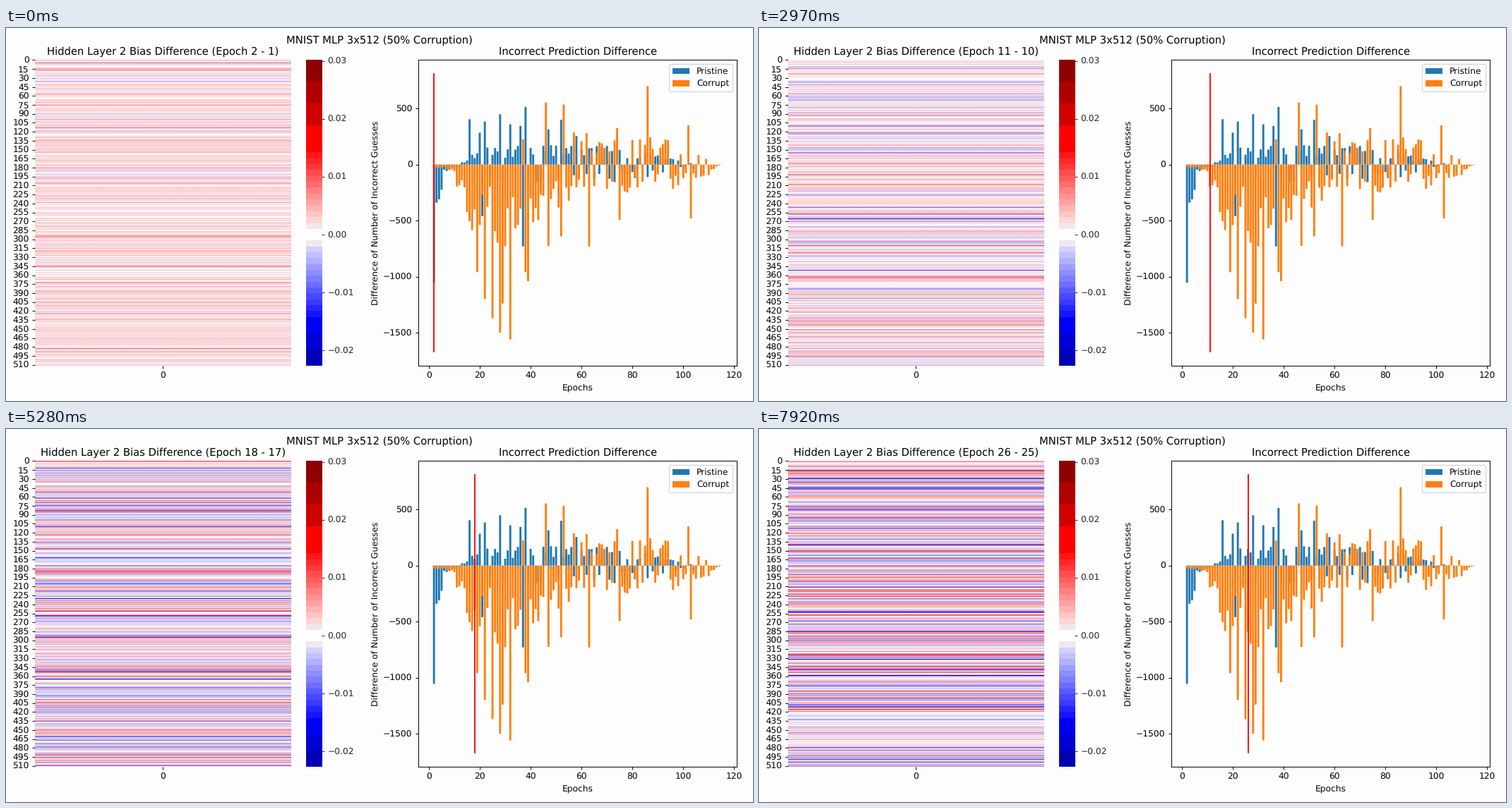
Animation, 1058 px wide and 529 px high, one loop 8 s. Source, as a matplotlib script:

```python
import numpy as np
import matplotlib.pyplot as plt
from matplotlib.animation import FuncAnimation
from matplotlib.colors import BoundaryNorm, ListedColormap, to_rgba
from matplotlib.patches import PathPatch
from matplotlib.path import Path

W, H = 1058, 529
PAPER = "#fdfdfd"
STEP_MS, TICK_MS, FRAMES = 330, 40, 200
STEPS, ROWS = 25, 512
LOW, HIGH = -0.0227, 0.0302
EPOCHS = np.arange(2, 116)


def guess_changes(seed, envelope, rise_from, rise_share, peaks):
    """Random bars under an envelope, with the tallest ones set by hand."""
    rng = np.random.default_rng(seed)
    height = np.interp(EPOCHS, *zip(*envelope)) * rng.uniform(0.35, 1, len(EPOCHS))
    rises = (EPOCHS >= rise_from) & (rng.random(len(EPOCHS)) < rise_share)
    values = np.where(rises, height, -height)
    for epoch, peak in peaks.items():
        values[epoch - EPOCHS[0]] = peak
    return values


def bias_differences():
    """One row of biases per step; the spread grows and the mean sinks to zero."""
    rng = np.random.default_rng(7)
    noise = rng.laplace(scale=0.7, size=ROWS)
    table = []
    for step in range(STEPS):
        mean = 0.0018 * max(0, 1 - step / 16)
        row = mean + (0.0023 + 0.00016 * step) * noise
        table.append(np.clip(row, LOW + 1e-5, HIGH - 1e-5))
        noise = 0.6 * noise + 0.8 * rng.laplace(scale=0.7, size=ROWS)
    return table


def banded_seismic():
    edges = np.concatenate([
        [LOW, -0.0199, -0.0172], np.linspace(-0.0143, -0.0011, 14),
        np.linspace(0.0009, 0.0141, 14), [0.0188, 0.0227, 0.0263, HIGH]])
    mids = (edges[:-1] + edges[1:]) / 2
    colors = plt.get_cmap("seismic")(0.5 + mids / (2 * HIGH))
    middle = np.searchsorted(edges, 0) - 1
    colors[middle] = to_rgba(PAPER)
    colors[[middle - 1, middle + 1]] = to_rgba("#f3e7ee")
    colors[np.searchsorted(edges, 0.015) - 1] = to_rgba("red")
    return ListedColormap(colors), BoundaryNorm(edges, len(colors))


def add_axes(left, right, top=45, bottom=479):
    return fig.add_axes([left / W, 1 - bottom / H,
                         (right - left) / W, (bottom - top) / H], facecolor=PAPER)


def add_bars(ax, values, color, label):
    verts = []
    for epoch, value in zip(EPOCHS, values):
        a, b = epoch - 0.4, epoch + 0.4
        verts += [(a, 0), (a, value), (b, value), (b, 0), (a, 0)]
    codes = ([Path.MOVETO] + [Path.LINETO] * 4) * len(values)
    ax.add_patch(PathPatch(Path(verts, codes), fc=color, lw=0, snap=False, label=label))


def add_bands(ax, values, extent, interpolation):
    ax.spines[:].set_visible(False)
    return ax.imshow(np.reshape(values, (-1, 1)), cmap=cmap, norm=norm,
                     aspect="auto", extent=extent, interpolation=interpolation,
                     interpolation_stage="rgba")


plt.rcParams.update({"font.family": "DejaVu Sans", "text.hinting": "no_hinting"})
fig = plt.figure(figsize=(12, 6), dpi=88.1667, facecolor=PAPER)
fig.suptitle("MNIST MLP 3x512 (50% Corruption)")
cmap, norm = banded_seismic()
biases = bias_differences()

heat_ax = add_axes(41.3, 403.3)
heat = add_bands(heat_ax, biases[0], (0, 1, ROWS, 0), "antialiased")
heat_ax.set_xticks([0.5], ["0"])
labels = range(0, ROWS, 15)
heat_ax.set_yticks([n + 0.5 for n in labels], [str(n) for n in labels])
title = heat_ax.set_title("")

scale_ax = add_axes(425, 447)
add_bands(scale_ax, np.linspace(HIGH - 1e-6, LOW + 1e-6, 868),
          (0, 1, LOW, HIGH), "nearest")
scale_ax.set_xticks([])
scale_ax.yaxis.tick_right()
scale_ax.set_yticks(np.arange(-2, 4) / 100)
scale_ax.tick_params(colors="#262626")

pristine = guess_changes(
    3, [(6, 110), (10, 30), (14, 30), (20, 150), (45, 190), (70, 170), (90, 100), (106, 0)],
    rise_from=10, rise_share=0.65,
    peaks={2: -1055, 3: -340, 4: -310, 5: -225, 16: 405, 20: 285, 21: -460, 22: 385,
           28: 450, 32: 360, 36: 345, 37: -730, 38: 515, 47: 315, 52: 400, 58: 255})
corrupt = guess_changes(
    5, [(2, 25), (8, 70), (14, 320), (17, 650), (35, 850), (45, 500), (60, 250),
        (90, 250), (107, 160), (115, 5)],
    rise_from=54, rise_share=0.35,
    peaks={19: -960, 22: -1200, 24: -200, 25: -1370, 28: -1500, 29: -1240, 31: -390,
           32: -1560, 37: 225, 38: -960, 39: -1040, 46: 555, 47: -725, 52: -640,
           53: 535, 62: 280, 63: -730, 74: 325, 75: -495, 86: 700, 102: 350, 103: -480})

bar_ax = add_axes(584.2, 1035.2)
add_bars(bar_ax, pristine, "C0", "Pristine")
add_bars(bar_ax, corrupt, "C1", "Corrupt")
marker, = bar_ax.plot([2, 2], [-1671, 812], color="red")
bar_ax.set(xlim=(-4.09, 121.09), ylim=(-1795, 936),
           xticks=range(0, 121, 20), yticks=range(-1500, 501, 500),
           xlabel="Epochs", ylabel="Difference of Number of Incorrect Guesses",
           title="Incorrect Prediction Difference")
bar_ax.legend(loc="upper right")


def update(frame):
    # Steps are not a multiple of the tick: switch on the tick that holds the change
    step = min((frame * TICK_MS + 30) // STEP_MS, STEPS - 1)
    epoch = step + 2
    heat.set_data(biases[step].reshape(-1, 1))
    title.set_text(f"Hidden Layer 2 Bias Difference (Epoch {epoch} - {epoch - 1})")
    marker.set_xdata([epoch, epoch])
    return heat, title, marker


anim = FuncAnimation(fig, update, frames=FRAMES, init_func=lambda: update(0),
                     interval=TICK_MS, repeat=True, repeat_delay=0)
plt.show()
```
